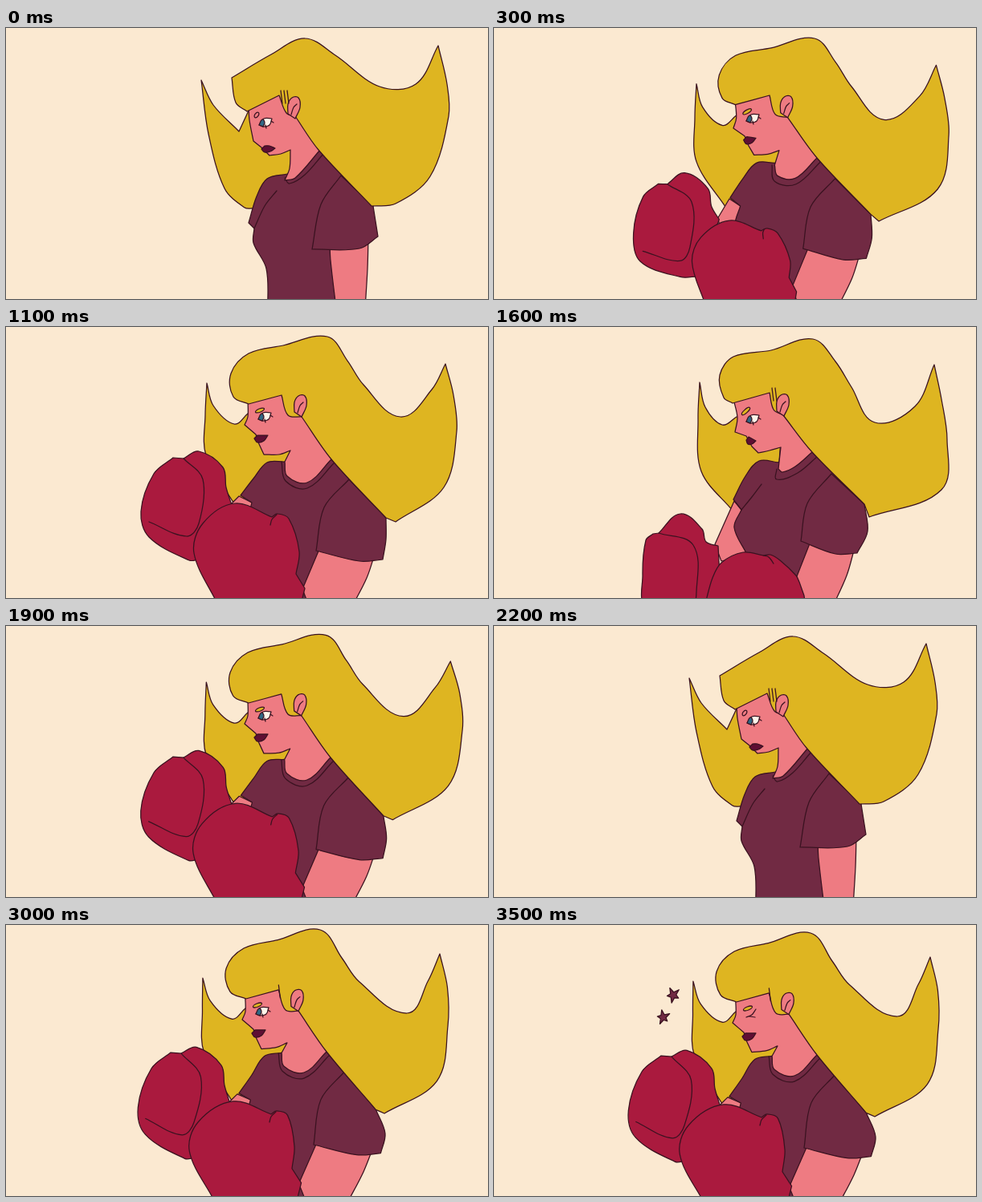
Recreate the animation shown at these times as an HTML page with a canvas. Size 600x338 px, loop 3600 ms.

```html
<!DOCTYPE html>
<html lang="en">
<head>
<meta charset="utf-8">
<title>Boxer</title>
<style>
html, body { margin: 0; width: 100%; height: 100%; overflow: hidden; background: #fbe9d1; }
canvas { display: block; width: 600px; height: 338px; }
</style>
</head>
<body>
<canvas id="stage" width="600" height="338"></canvas>
<script>
const ctx = document.getElementById('stage').getContext('2d');
const BG = '#fbe9d1', HAIR = '#deb521', SKIN = '#ee7b82', SHIRT = '#712a43';
const GLOVE = '#aa1a3e', LIP = '#5f0f33', LINE = '#3a1220', IRIS = '#2f6884', WHITE = '#fff5ea';

// "x,y" is a smooth key point, "x,y!" a corner
const parse = s => s.split(' ').map(t => {
  const [x, y] = t.replace('!', '').split(',').map(Number);
  return { x, y, hard: t.endsWith('!') };
});
const mapParts = (parts, f) =>
  Object.fromEntries(Object.entries(parts).map(([name, v]) => [name, f(v, name)]));
const pose = parts => mapParts(parts, parse);
const mapPoints = (p, f) => mapParts(p, pts => pts.map(q => ({ ...q, ...f(q) })));

const sad = pose({
  back: '243,65! 258,96 290,129! 302,103! 350,100! 365,180! 340,215! 308,225! 297,224 272,200 252,132',
  torso: '350,182! 325,188 312,210 302,243! 309,250! 308,268 324,300 326,350! 411,350! 440,260! 457,222! 391,152!',
  arm: '403,270! 404,290 411,350! 447,350! 450,300 451,260!',
  sleeve: '417,184! 392,220 381,276! 440,275 463,260! 457,222!',
  fold: '337,203 322,222 309,250',
  collar: '347,187 353,194 372,183 395,157',
  face: '302,98! 303,115 308,141! 318,149! 328,159! 342,157 354,152! 353,175 347,190! 360,187 391,152! 375,110! 350,75!',
  hair: '281,62! 330,33 372,13 410,34 465,73 510,70 538,22! 549,70 551,110 528,185 485,219 455,222! 389,152 360,110! 349,106 340,84! 300,104! 286,93',
  lips: '318,151! 322,147! 328,147 335,150! 329,154 322,155',
  ear: '359,101', brow: '310,111 314,106', eye: '315,121', temple: '339,84'
});

const crouch = pose({
  back: '256,69! 263,100 284,122 302,112! 360,100! 355,168! 330,185! 297,229! 258,180 254,115',
  leftArm: '299,217! 275,271! 283,292! 316,285! 308,228!',
  torso: '354,169! 330,167 313,186 298,215! 308,228! 299,250 314,282! 330,350! 395,350! 445,278! 461,221! 396,156!',
  arm: '395,265! 375,316! 385,350! 421,350! 439,310 449,275!',
  sleeve: '420,183! 390,220 382,267! 425,283 452,282! 465,255 461,221!',
  fold: '333,196 321,212 308,228',
  collar: '352,177 352,190 378,182 402,162',
  face: '298,90! 303,113 300,131! 314,136! 321,149! 329,157! 343,154 357,150! 354,177! 359,181 375,174 396,156! 378,110! 350,75!',
  hair: '297,95! 286,88 281,60 298,37 345,29 397,15 425,43 445,75 474,119 524,99 548,47! 557,90 564,140 557,203 467,237! 461,221! 396,156 360,110! 348,103 343,82!',
  lips: '314,141! 317,137! 326,142! 321,146 316,146',
  ear: '360,99', brow: '309,109 318,101', eye: '314,118', temple: '343,82',
  glove1: '205,257! 232,233 259,252 264,268 279,273! 283,350! 240,350 190,350 185,310 189,266 198,258!',
  seam: '205,257 248,272 252,330 245,350 200,350',
  glove2: '263,345! 272,313 283,294 310,281 336,285! 344,284 356,291 376,310 380,318! 386,335! 388,350!',
  crease: '348,295 342,287 335,285'
});

const guard = pose({
  back: '250,70! 258,98 284,121 301,108! 360,100! 353,168! 325,190! 285,222! 249,160 248,110',
  leftArm: '290,211! 280,221! 284,235! 312,235! 306,219!',
  torso: '347,168! 325,169 308,189 292,210! 306,219! 301,245 318,285! 330,350! 400,350! 455,285! 473,238! 405,165!',
  arm: '393,270! 369,327! 378,350! 430,350! 449,313 460,280!',
  sleeve: '427,190! 396,225 386,279! 440,292 469,290! 473,265 473,238!',
  collar: '343,168 348,192 375,201 409,169',
  face: '301,90! 301,112 297,122! 311,134! 315,146! 321,159! 340,159 354,154! 347,168! 350,186 375,194 405,165! 385,112! 356,75!',
  hair: '302,96! 283,87 280,58 302,33 345,23 400,12 425,42 445,72 491,112 530,78 547,46! 557,85 561,130 545,200 485,243! 473,238! 405,165 368,112! 351,110 343,85!',
  lips: '309,139! 313,135! 326,135! 321,142 313,144',
  ear: '367,100', brow: '311,106 321,102', eye: '314,115', temple: '340,85',
  glove1: '221,164! 240,155 270,175 274,200 281,222! 240,290! 228,291 178,262 168,230 184,183 208,163!',
  seam: '221,164 245,190 240,245 225,261 178,243',
  glove2: '263,345! 234,282 245,245 285,220 331,237! 338,233 352,239 365,280 361,308! 372,326! 366,350!',
  crease: '329,247 331,240 337,234'
});

// Each pull [x, y, dx, dy] drags the drawing around it; nearer pulls win
function warp(p, pulls) {
  return mapPoints(p, q => {
    let dx = 0, dy = 0, sum = 0;
    for (const [x, y, px, py] of pulls) {
      const w = 1 / (((q.x - x) ** 2 + (q.y - y) ** 2) ** 2 + 1);
      dx += w * px; dy += w * py; sum += w;
    }
    return { x: q.x + dx / sum, y: q.y + dy / sum };
  });
}

// Blends the parts two poses share
function mix(a, b, k) {
  const shared = Object.fromEntries(Object.entries(a).filter(([name]) => b[name]));
  return mapParts(shared, (pts, name) => pts.map((p, i) => {
    const q = b[name][i];
    return { x: p.x + (q.x - p.x) * k, y: p.y + (q.y - p.y) * k, hard: p.hard };
  }));
}

const shift = (p, dx, dy) => mapPoints(p, q => ({ x: q.x + dx, y: q.y + dy }));
const swing = (p, d) => mapPoints(p, q => ({ x: q.x + d * Math.max(0, q.x - 500) / 60 }));

const wink = warp(guard, [
  [320, 120, 0, 0], [302, 33, -3, 0], [400, 12, -6, -2], [425, 42, -4, 3],
  [491, 112, 11, 2], [547, 46, -4, -6], [561, 130, -8, 0], [485, 243, -11, -4],
  [405, 165, -3, -3], [365, 195, -1, -6], [473, 260, 2, -1], [381, 280, 0, -1],
  [331, 237, 2, 3], [365, 280, -3, 0], [245, 240, -3, 5], [274, 200, 1, 4], [200, 180, 0, 0]
]);

const drawings = [
  { p: sad, strands: 3 },
  { p: shift(wink, -3, -4), strands: 1 },
  { p: crouch, strands: 2 },
  { p: swing(mix(crouch, guard, 0.33), 5), strands: 1 },
  { p: swing(mix(crouch, guard, 0.67), 4), strands: 0 },
  { p: guard, strands: 0 },
  { p: swing(mix(guard, wink, 0.33), 10), strands: 0 },
  { p: swing(mix(guard, wink, 0.67), 9), strands: 1 },
  { p: wink, strands: 1, shut: true }
];

function trace(pts, closed) {
  const n = pts.length;
  const at = i => pts[(i + n) % n];
  const handle = (i, from, to, sign) => {
    const p = at(i), len = Math.hypot(to.x - from.x, to.y - from.y) / 3;
    const end = p.hard || (!closed && (i === 0 || i === n - 1));
    const a = end ? from : at(i - 1), b = end ? to : at(i + 1);
    const d = Math.hypot(b.x - a.x, b.y - a.y) || 1;
    return [p.x + sign * (b.x - a.x) / d * len, p.y + sign * (b.y - a.y) / d * len];
  };
  ctx.beginPath();
  ctx.moveTo(pts[0].x, pts[0].y);
  for (let i = 0; i < (closed ? n : n - 1); i++) {
    const p = at(i), q = at(i + 1);
    ctx.bezierCurveTo(...handle(i, p, q, 1), ...handle((i + 1) % n, p, q, -1), q.x, q.y);
  }
  if (closed) ctx.closePath();
}

// A shape with no fill is an open line
function ink(pts, fill) {
  if (!pts) return;
  trace(pts, !!fill);
  if (fill) {
    ctx.fillStyle = fill;
    ctx.fill();
  }
  ctx.stroke();
}

const stamp = (s, { x, y }, fill) =>
  ink(parse(s).map(q => ({ x: q.x + x, y: q.y + y, hard: q.hard })), fill);

function drawHead({ p, strands, shut }) {
  const [eye] = p.eye, [ear] = p.ear, [temple] = p.temple, [a, b] = p.brow;

  stamp('-8,6! -8,-6 -3,-14 5,-14 7,-2 1,12!', ear, SKIN);
  stamp('-4,7 -1,-2 3,-6', ear);

  ctx.beginPath();
  ctx.ellipse((a.x + b.x) / 2, (a.y + b.y) / 2, Math.hypot(b.x - a.x, b.y - a.y) / 2 + 0.5,
    2.2, Math.atan2(b.y - a.y, b.x - a.x), 0, 2 * Math.PI);
  ctx.fillStyle = p === sad ? SKIN : HAIR;
  ctx.fill();
  ctx.stroke();

  if (shut) {
    stamp('0,0 7,-3 12,-10', eye);
    stamp('4,-1 11,0', eye);
  } else {
    stamp('0,0! 6,-8 16,-8! 13,0 5,2', eye, WHITE);
    stamp('0,0! 4,-7 7,-3 5,2!', eye, IRIS);
    stamp('8,0 9,4', eye);
    stamp('15,-5 18,-3', eye);
  }
  for (let i = 0; i < strands; i++) stamp('3,-6 5,10', { x: temple.x + 4 * i, y: temple.y });
}

function star(x, y, r, turn) {
  ctx.beginPath();
  for (let i = 0; i < 10; i++) {
    const a = turn + i * Math.PI / 5;
    const d = i % 2 ? r * 0.42 : r * (i % 4 ? 0.85 : 1.1);
    ctx.lineTo(x + Math.cos(a) * d, y + Math.sin(a) * d);
  }
  ctx.closePath();
  ctx.fillStyle = SHIRT;
  ctx.fill();
  ctx.stroke();
}

function draw(drawing) {
  const { p, shut } = drawing;
  ctx.fillStyle = BG;
  ctx.fillRect(0, 0, 600, 338);
  ctx.strokeStyle = LINE;
  ctx.lineWidth = 1.25;
  ctx.lineJoin = ctx.lineCap = 'round';

  ink(p.back, HAIR);
  ink(p.leftArm, SKIN);
  ink(p.torso, SHIRT);
  ink(p.arm, SKIN);
  ink(p.sleeve, SHIRT);
  ink(p.fold);
  ink(p.collar);
  ink(p.face, SKIN);
  ink(p.hair, HAIR);
  drawHead(drawing);
  ink(p.lips, LIP);
  ink(p.glove1, GLOVE);
  ink(p.seam);
  ink(p.glove2, GLOVE);
  ink(p.crease);

  if (shut) {
    star(223, 87.5, 9, -0.75);
    star(210.5, 115, 8.5, -0.5);
  }
}

// Drawings run at 80 ms each, shown on a 100 ms beat
function tick() {
  const step = Math.floor(performance.now() % 3600 / 100);
  draw(drawings[Math.ceil(step * 1.25 - 0.5) % drawings.length]);
  requestAnimationFrame(tick);
}
tick();
</script>
</body>
</html>
```
